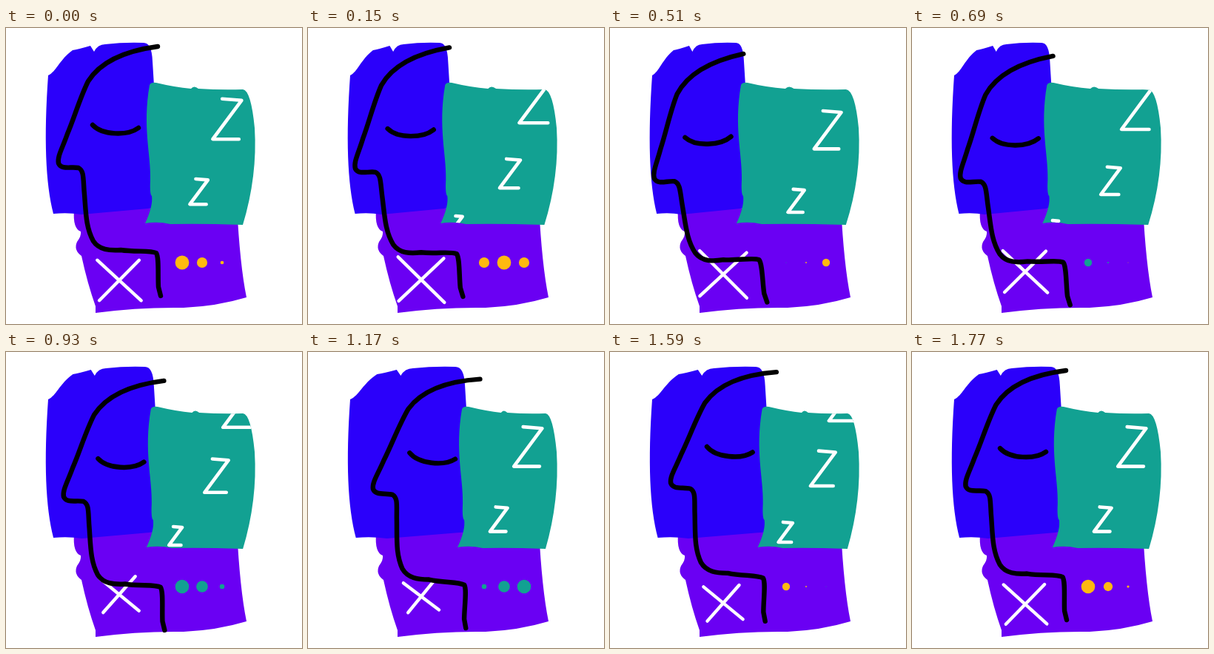
Recreate the animation shown at these times as an HTML page with a canvas. Size 400 by 400 pixels, loop 1.8 s.

```html
<!DOCTYPE html>
<html lang="en">
<head>
<meta charset="utf-8">
<title>Sleeping profile</title>
<style>
  html, body { margin: 0; width: 100%; height: 100%; overflow: hidden; background: #fff; }
  canvas { display: block; width: 400px; height: 400px; }
</style>
</head>
<body>
<canvas id="stage"></canvas>
<script>
const LOOP = 1800, STEP = 30, TAU = Math.PI * 2;
const BLUE = '#2b00fa', PURPLE = '#6a00f3', TEAL = '#12a192', YELLOW = '#ffb910';

const canvas = document.getElementById('stage');
const ctx = canvas.getContext('2d');
const ratio = window.devicePixelRatio || 1;
canvas.width = canvas.height = 400 * ratio;

// Paper cut-outs; "x,y" pairs can be shifted by stretch().
const blueShape = 'M57,64 C68,59 72,43 90,30 Q97,29 114,24 L119,32 Q124,22 134,22 ' +
  'Q160,19 186,20 Q197,20 198,45 Q205,140 203,243 L102,252 Q84,249 64,251 Q48,190 57,64Z';
const tealShape = 'M194,77 Q196,73 203,74 Q228,80 250,82 Q254,77 260,82 Q290,84 320,83 ' +
  'Q331,84 336,135 Q340,200 320,266 Q262,264 222,265 Q205,261 188,264 ' +
  'Q199,240 197,227 Q194,225 195,205 C196,170 184,135 194,77Z';
const purple = new Path2D('M92,246 Q90,271 101,275 Q102,281 96,289 Q91,300 102,308 ' +
  'Q110,345 121,376 L121,385 Q180,377 240,378 Q285,376 325,364 Q316,320 312,240Z');

const profile = new Path2D('M205,25 C160,31 128,45 111,72 C100,94 92,122 83,143 ' +
  'C76,163 69,174 71,183 C75,192 88,187 98,189 C106,193 104,205 106,225 ' +
  'C108,250 108,270 118,288 C126,300 140,301 155,300 C175,303 195,300 203,304 ' +
  'C207,310 205,335 206,350 L209,362');
const eye = new Path2D('M117,131 C130,145 164,146 179,135');

const clamp = v => Math.max(0, Math.min(1, v));

// Shifts every point sideways by dx times the weight at its x.
function stretch(shape, dx, weight) {
  return new Path2D(shape.replace(/(\d+),(\d+)/g,
    (_, x, y) => `${+x + dx * weight(+x)},${y}`));
}

function fill(path, color) {
  ctx.fillStyle = color;
  ctx.fill(path);
}

function pen(color, width) {
  ctx.strokeStyle = color;
  ctx.lineWidth = width;
  ctx.lineCap = ctx.lineJoin = 'round';
}

// A Z grows while it drifts up along a bent path; x, y is its lower left corner.
function drawZ(age) {
  const u = age / 300, w = 9 + 6.6 * u;
  const x = 172 + 24 * u + 27 * Math.sin(u * TAU / 10) + 4.7 * Math.sin(u * TAU / 5);
  const y = 283 - 20 * u - 24 * Math.max(0, u - 1.8);
  ctx.beginPath();
  ctx.moveTo(x + w * 0.36, y - w * 1.54);
  ctx.lineTo(x + w * 1.1, y - w * 1.48);
  ctx.lineTo(x, y);
  ctx.lineTo(x + w, y);
  ctx.stroke();
}

function drawCross(angle, lift) {
  const swing = Math.sin(angle + 0.3);
  const size = 36.9 + 8.2 * swing;
  ctx.save();
  ctx.translate(153, 341 - 6.7 * lift);
  ctx.rotate((-2.7 + 4.4 * swing) * Math.PI / 180);
  pen('#fff', 4.4);
  ctx.beginPath();
  for (const side of [1, -1]) {
    const hx = (size + side) * 0.72 * side, hy = (size + side) * 0.694;
    ctx.moveTo(-hx, -hy);
    ctx.lineTo(hx, hy);
  }
  ctx.stroke();
  ctx.restore();
}

// Each dot pulses 150 ms after its neighbour and swaps colour when smallest.
function drawDots(t) {
  for (let i = 0; i < 3; i++) {
    const own = (t - i * 150 + LOOP) % LOOP;
    const r = 4.7 * (1 + Math.cos(own / 900 * TAU));
    ctx.fillStyle = own >= 450 && own < 1350 ? TEAL : YELLOW;
    ctx.beginPath();
    ctx.arc(238 + i * 27, 317, r, 0, TAU);
    ctx.fill();
  }
}

function drawHead(sway, lift) {
  ctx.save();
  ctx.translate(209 + 2.7 * lift, 362 + 7 * lift);
  ctx.rotate(-0.085 * sway);
  ctx.translate(-209, -362);
  pen('#000', 6.4);
  ctx.stroke(profile);
  ctx.stroke(eye);
  ctx.restore();
}

function draw(t) {
  const angle = t / LOOP * TAU;
  const sway = Math.sin(angle), lift = 1 - Math.cos(angle);
  const dx = -17.4 * sway;
  const teal = stretch(tealShape, dx, x => clamp((327 - x) / 100));

  ctx.setTransform(ratio, 0, 0, ratio, 0, 0);
  ctx.fillStyle = '#fff';
  ctx.fillRect(0, 0, 400, 400);
  fill(purple, PURPLE);
  fill(stretch(blueShape, dx, x => clamp((x - 57) / 138)), BLUE);
  fill(teal, TEAL);

  ctx.save();
  ctx.clip(teal);
  pen('#fff', 4.6);
  for (let i = 0; i < 3; i++) drawZ(t % 600 + i * 600);
  ctx.restore();

  drawCross(angle, lift);
  drawDots(t);
  drawHead(sway, lift);
}

const start = performance.now();
function tick() {
  const t = Math.max(0, performance.now() - start) % LOOP;
  draw(Math.floor(t / STEP) * STEP);
  requestAnimationFrame(tick);
}
tick();
</script>
</body>
</html>
```
